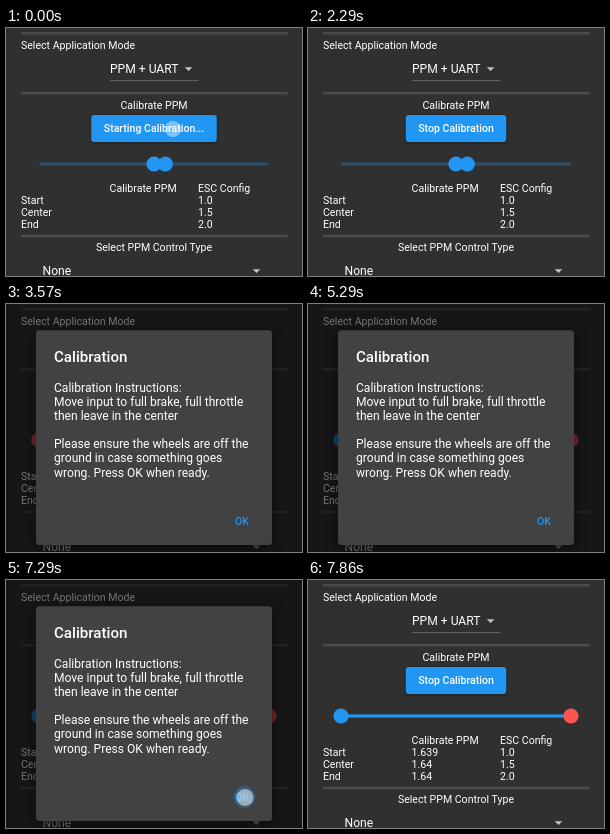
An HTML page with a canvas that plays this animation: 296x248 px, repeating every 8 s.

```html
<!DOCTYPE html>
<html lang="en">
<head>
<meta charset="utf-8">
<title>PPM calibration</title>
<style>
  html, body { margin: 0; width: 100%; height: 100%; overflow: hidden; background: #303030; }
  canvas { display: block; width: 296px; height: 248px; }
</style>
</head>
<body>
<canvas id="stage"></canvas>
<script>
const W = 296, H = 248, LOOP = 8000, STEP = 1000 / 7;
const BLUE = '#2196f3', RED = '#ff5252';
const SMALL = 10.57, BODY = 12.08, TITLE = 15.1;
const canvas = document.getElementById('stage');
const ctx = canvas.getContext('2d');
const dpr = window.devicePixelRatio || 1;
canvas.width = W * dpr;
canvas.height = H * dpr;

const clamp = v => Math.max(0, Math.min(1, v));
const ease = v => v * v * (3 - 2 * v);

function text(str, x, y, { size = SMALL, weight = 400, color = '#fff', align = 'left' } = {}) {
  ctx.font = `${weight} ${size}px Roboto, "Noto Sans", sans-serif`;
  ctx.textAlign = align;
  ctx.fillStyle = color;
  ctx.fillText(str, x, y);
}

function rect(x, y, w, h, color) {
  ctx.fillStyle = color;
  ctx.fillRect(x, y, w, h);
}

function box(x, y, w, h, r, color) {
  ctx.fillStyle = color;
  ctx.beginPath();
  ctx.roundRect(x, y, w, h, r);
  ctx.fill();
}

function disc(x, y, r, color) {
  ctx.fillStyle = color;
  ctx.beginPath();
  ctx.arc(x, y, r, 0, Math.PI * 2);
  ctx.fill();
}

function shadow(color, blur, dy) {
  ctx.shadowColor = color;
  ctx.shadowBlur = blur * dpr;
  ctx.shadowOffsetY = dy * dpr;
}

function arrow(x, y) {
  ctx.fillStyle = '#c4c4c4';
  ctx.beginPath();
  ctx.moveTo(x - 3.8, y);
  ctx.lineTo(x + 3.8, y);
  ctx.lineTo(x, y + 3.8);
  ctx.fill();
}

function touch(x, y, r, alpha) {
  if (alpha > 0) disc(x, y, r, `rgba(255,255,255,${alpha})`);
}

function button(label, width) {
  ctx.save();
  shadow('rgba(0,0,0,.4)', 3, 1);
  box(148 - width / 2, 87, width, 27, 3, BLUE);
  ctx.restore();
  text(label, 148, 104.3, { weight: 500, align: 'center' });
}

function slider(low, high, highColor) {
  const y = 136;
  box(33, y - 1.5, 230, 3, 1.5, 'rgba(33,150,243,.3)');
  rect(low, y - 1.5, high - low, 3, BLUE);
  disc(low, y, 7.6, BLUE);
  disc(high, y, 7.6, highColor);
}

function sliderAt(n) {
  if (n < 23) return [148, 159.3, BLUE];
  return [33, 33 + 230 * ease(clamp((n - 25) / 3)), RED];
}

function page(n) {
  rect(0, 0, W, H, '#303030');
  for (const y of [4, 64, 206.7]) rect(15, y, 266.5, 2.5, '#4b4b4b');
  text('Select Application Mode', 15, 21);
  text('PPM + UART', 104, 45.3, { size: BODY });
  arrow(182.6, 39.3);
  rect(104, 52.3, 88.5, 0.8, '#747474');
  text('Calibrate PPM', 148, 80.6, { align: 'center' });
  if (n < 14) button('Starting Calibration...', 125.5);
  else button('Stop Calibration', 100.5);
  slider(...sliderAt(n));

  const measured = n < 29 ? ['', '', ''] : ['1.639', '1.64', '1.64'];
  text('Calibrate PPM', 103.6, 163.5);
  text('ESC Config', 192, 163.5);
  ['Start', 'Center', 'End'].forEach((name, i) => {
    const y = 175.7 + i * 12.2;
    text(name, 15, y);
    text(measured[i], 103.6, y);
    text((1 + i / 2).toFixed(1), 192, y);
  });

  text('Select PPM Control Type', 148, 222.8, { align: 'center' });
  text('None', 36.6, 247.3, { size: BODY });
  arrow(250.5, 241.3);
  touch(167, 101, 8, 0.42 - n * 0.21);
}

const message = [
  'Calibration Instructions:',
  'Move input to full brake, full throttle',
  'then leave in the center',
  '',
  'Please ensure the wheels are off the',
  'ground in case something goes',
  'wrong. Press OK when ready.'
];

function dialog(n) {
  const shown = Math.min(clamp((n - 16) / 3), clamp((55 - n) / 3));
  if (!shown) return;
  ctx.save();
  ctx.globalAlpha = shown;
  rect(0, 0, W, H, 'rgba(0,0,0,.54)');
  ctx.save();
  shadow('rgba(0,0,0,.5)', 12, 3);
  box(30, 26.3, 236, 214.7, 3.5, '#424242');
  ctx.restore();
  text('Calibration', 48, 58.3, { size: TITLE, weight: 500 });
  message.forEach((line, i) => text(line, 48, 87.6 + i * 14.16, { size: BODY }));

  const press = Math.min(clamp((n - 47) / 2), clamp((53 - n) / 2));
  if (press > 0) disc(238.5, 217, 11, `rgba(33,150,243,${0.3 * press})`);
  text('OK', 236, 220.8, { weight: 500, color: BLUE, align: 'center' });
  touch(239, 217.5, 8.5, 0.5 * press);
  ctx.restore();
}

function draw(now) {
  const n = Math.floor(((now % LOOP) + 5) / STEP) % 56;
  ctx.setTransform(dpr, 0, 0, dpr, 0, 0);
  page(n);
  dialog(n);
}

let start;
function tick(now) {
  start ??= now;
  draw(Math.max(0, now - start));
  requestAnimationFrame(tick);
}
draw(0);
requestAnimationFrame(tick);
</script>
</body>
</html>
```
